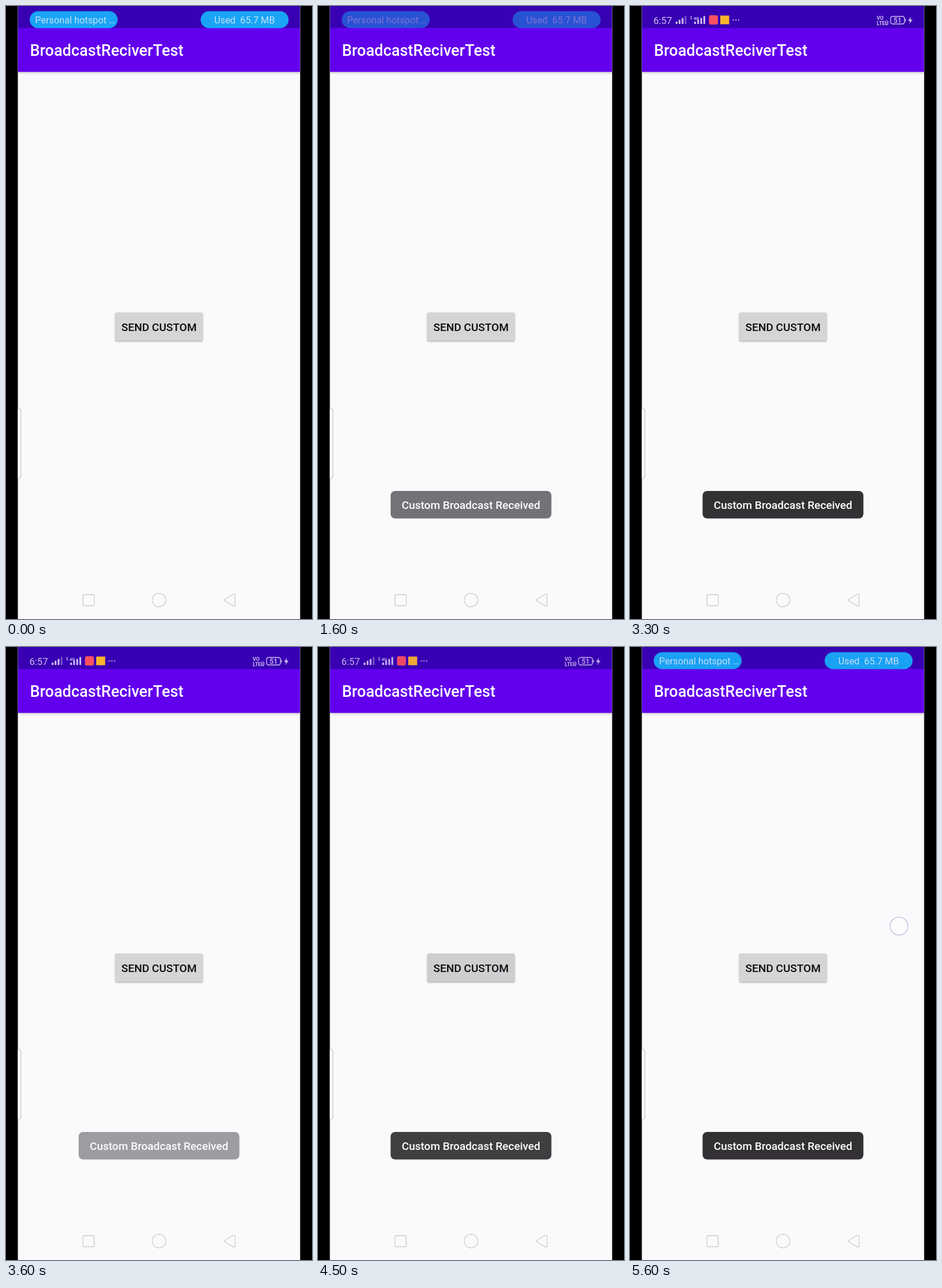
An HTML page with a canvas for the animation above (5.7 s loop, 529 by 1058 pixels).

```html
<!DOCTYPE html>
<html lang="en">
<head>
<meta charset="utf-8">
<title>Broadcast receiver demo</title>
<style>
  html, body { margin: 0; width: 100%; height: 100%; overflow: hidden; background: #000; }
  canvas { display: block; width: 529px; height: 1058px; }
</style>
</head>
<body>
<canvas id="stage" width="529" height="1058"></canvas>
<script>
const W = 529, H = 1058, LOOP = 5700, STEP = 100;
const stage = document.getElementById('stage');
const screen = stage.getContext('2d');
const layer = Object.assign(document.createElement('canvas'), { width: W, height: H });
const layerCtx = layer.getContext('2d');
let g = screen;

// Eased 0..1 progress between two times
const ramp = (t, from, to) => {
  const p = Math.min(1, Math.max(0, (t - from) / (to - from)));
  return (1 - Math.cos(Math.PI * p)) / 2;
};
const pulse = (t, in0, in1, out0, out1) => ramp(t, in0, in1) * (1 - ramp(t, out0, out1));

function rect(x, y, w, h, color) {
  g.fillStyle = color;
  g.fillRect(x, y, w, h);
}

function round(x, y, w, h, r, fill, stroke, line = 1.3) {
  g.beginPath();
  g.roundRect(x, y, w, h, r);
  if (fill) { g.fillStyle = fill; g.fill(); }
  if (stroke) { g.strokeStyle = stroke; g.lineWidth = line; g.stroke(); }
}

function circle(x, y, r, fill, stroke, line = 1.3) {
  round(x - r, y - r, 2 * r, 2 * r, r, fill, stroke, line);
}

function poly(points, fill, stroke) {
  g.beginPath();
  points.forEach(([x, y]) => g.lineTo(x, y));
  g.closePath();
  if (fill) { g.fillStyle = fill; g.fill(); }
  if (stroke) { g.strokeStyle = stroke; g.lineWidth = 1.3; g.lineJoin = 'round'; g.stroke(); }
}

function text(str, x, y, size, weight, color, align = 'left') {
  g.font = `${weight} ${size}px Roboto, sans-serif`;
  g.textAlign = align;
  g.fillStyle = color;
  g.fillText(str, x, y);
}

// Draws a group off screen so that it fades as one piece
function fade(alpha, draw) {
  if (alpha <= 0) return;
  layerCtx.clearRect(0, 0, W, H);
  g = layerCtx;
  draw();
  g = screen;
  g.globalAlpha = alpha;
  g.drawImage(layer, 0, 0);
  g.globalAlpha = 1;
}

function shadowed(color, blur, dy, draw) {
  g.save();
  g.shadowColor = color;
  g.shadowBlur = blur;
  g.shadowOffsetY = dy;
  draw();
  g.restore();
}

function base() {
  rect(0, 0, W, H, '#000');
  rect(20.5, 0, 488, H, '#faf9fc');
  g.save();
  g.beginPath();
  g.rect(20.5, 0, 488, H);
  g.clip();
  shadowed('rgba(0,0,0,.3)', 5, 1.5, () => rect(20.5, 38, 488, 75.7, '#6200ee'));
  rect(20.5, 0, 488, 38, '#3800b3');
  round(10, 694.5, 15.7, 121, 4, '#fbfafc', '#c9c8ca');
  g.restore();
  text('BroadcastReciverTest', 41.5, 86, 27, 500, '#fff');

  const line = '#cbcacc';
  round(133, 1016, 19.5, 19, 2.5, null, line);
  circle(264.5, 1025.3, 11.7, null, line);
  poly([[376.5, 1025.3], [393, 1015], [396, 1016], [396, 1034.6], [393, 1035.6]], null, line);
}

function button(press) {
  const shade = (a, b) => Math.round(a + (b - a) * press);
  const color = `rgb(${shade(214, 188)},${shade(212, 185)},${shade(215, 188)})`;
  shadowed('rgba(0,0,0,.35)', 3, 1.4, () => round(189, 529, 151, 48.7, 2.5, color));
  text('SEND CUSTOM', 264.5, 560.5, 19, 500, '#0c0b0d', 'center');
}

function pills() {
  const blue = '#1aa4f6', ink = '#c3e2fa';
  round(41, 9, 152, 29.3, 14.6, blue);
  round(336.5, 9, 152, 29.3, 14.6, blue);
  text('Personal hotspot …', 50.3, 30, 16.27, 400, ink);
  text('Used  65.7 MB', 412.5, 30, 16.27, 400, ink, 'center');
}

function bars(x, gap, base, grow, dimLast) {
  for (let i = 0; i < 4; i++) {
    const h = base + grow * i;
    rect(x + gap * i, 31 - h, 3, h, dimLast && i === 3 ? '#7a55cc' : '#cdbfee');
  }
}

function statusIcons() {
  const ink = '#cdbfee';
  text('6:57', 40.5, 31, 16.6, 400, ink);
  bars(79, 5.2, 4, 3.2, true);
  bars(111, 5.3, 4, 3.2, false);
  poly([[104, 19.5], [105.8, 17], [107.6, 19.5]], ink);
  poly([[104, 21], [105.8, 23.5], [107.6, 21]], ink);
  text('4G', 110, 23.5, 7.5, 700, ink);
  round(136.5, 16, 15.5, 16, 3, '#fb4f62');
  rect(156, 16.5, 15.5, 15, '#fbb32d');
  for (let i = 0; i < 3; i++) circle(178.5 + 4.6 * i, 24.2, 1.1, ink);

  text('VO', 426.5, 24, 8.8, 700, ink);
  text('LTE', 426.5, 32.5, 8.8, 700, ink);
  round(441.5, 25.8, 4.5, 6.5, 1, null, ink, 1);
  text('2', 443.7, 31.5, 6, 700, ink, 'center');
  round(450.5, 18, 24, 13, 3.5, null, ink, 1.4);
  rect(475.5, 22, 1.3, 5, ink);
  text('51', 462.5, 29, 12.5, 500, ink, 'center');
  poly([[485.6, 18.5], [480.6, 25.8], [484, 25.8], [483.2, 31], [488.3, 23.6], [484.8, 23.6]], ink);
}

function toast() {
  round(125.5, 837, 278, 47.5, 8, '#343135');
  text('Custom Broadcast Received', 264.5, 868, 19, 500, '#fff', 'center');
}

function touch(x, y) {
  circle(x, y, 15.4, 'rgba(255,255,255,.55)', '#c9c7e6', 1.6);
}

function paint(t) {
  base();
  button(Math.max(pulse(t, 1100, 1250, 1400, 1580), pulse(t, 4050, 4250, 4350, 4580)));
  fade(1 - ramp(t, 1350, 1850) + ramp(t, 5140, 5640), pills);
  fade(pulse(t, 2040, 2540, 4420, 4900), statusIcons);
  fade(pulse(t, 1356, 1756, 3390, 3790) + ramp(t, 4167, 4567), toast);
  fade(Math.max(pulse(t, 1050, 1150, 1340, 1580), pulse(t, 4030, 4100, 4150, 4420)),
    () => touch(279.5, 558));
  if (t >= 5600) touch(465, 481.7);
}

function frame() {
  const t = performance.now() % LOOP;
  paint(Math.floor(t / STEP) * STEP);
  requestAnimationFrame(frame);
}
frame();
</script>
</body>
</html>
```
